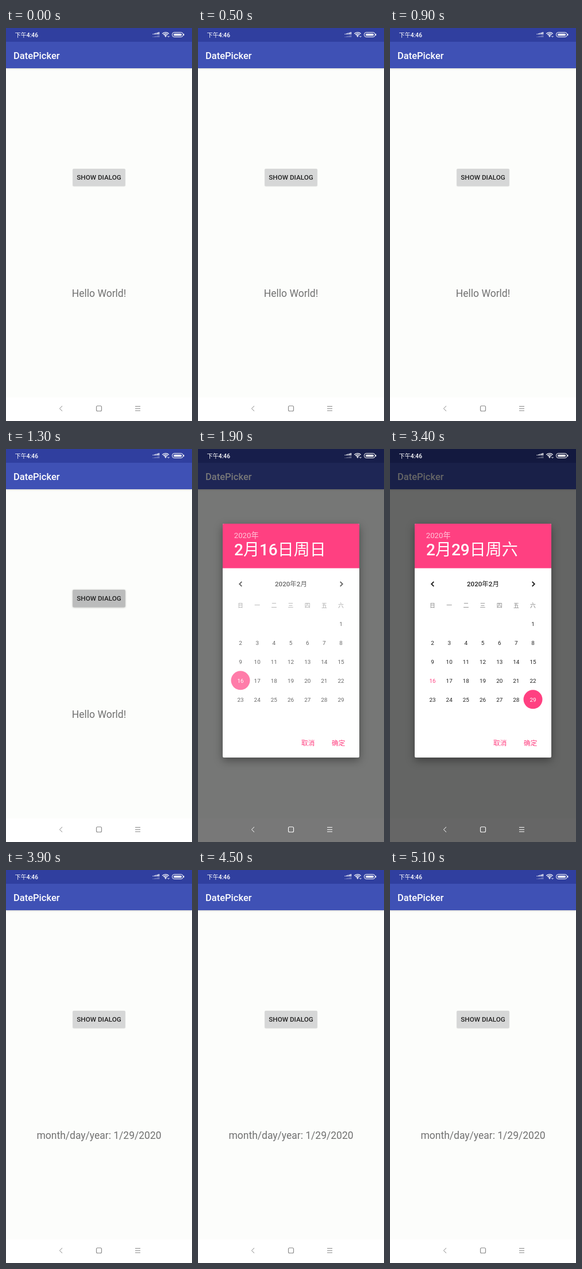
Recreate the animation shown at these times as an HTML page with a canvas. Size 324 by 684 pixels, loop 5200 ms.

```html
<!DOCTYPE html>
<html lang="zh">
<head>
<meta charset="utf-8">
<title>DatePicker</title>
<style>
html, body { margin: 0; width: 100%; height: 100%; overflow: hidden; background: #fff; }
canvas { display: block; width: 324px; height: 684px; }
</style>
</head>
<body>
<canvas id="stage"></canvas>
<script>
const W = 324, H = 684, LOOP = 5200, STEP = 100;
const PINK = '#ff4081';
const WEEK = '日一二三四五六';
const FAMILY = 'Roboto, "Noto Sans CJK SC", "Noto Sans CJK", sans-serif';
const CJK_FAMILY = '"Noto Sans CJK SC", "Noto Sans CJK", sans-serif';
const ratio = window.devicePixelRatio || 1;

const stage = document.getElementById('stage');
const screen = prepare(stage);
const layer = document.createElement('canvas');
const sheet = prepare(layer);
let g = screen;

function prepare(canvas) {
  canvas.width = W * ratio;
  canvas.height = H * ratio;
  const c = canvas.getContext('2d');
  c.scale(ratio, ratio);
  return c;
}

const clamp = v => Math.max(0, Math.min(1, v));
const ramp = (t, from, length) => clamp((t - from) / length);

function rect(x, y, w, h, color) {
  g.fillStyle = color;
  g.fillRect(x, y, w, h);
}

function round(x, y, w, h, r, color) {
  g.beginPath();
  g.roundRect(x, y, w, h, r);
  g.fillStyle = color;
  g.fill();
}

function line(points, color, width) {
  g.beginPath();
  points.forEach(([x, y], i) => i ? g.lineTo(x, y) : g.moveTo(x, y));
  g.strokeStyle = color;
  g.lineWidth = width;
  g.stroke();
}

function text(s, x, y, size, color, weight = 400, align = 'left') {
  g.font = `${weight} ${size}px ${FAMILY}`;
  g.textAlign = align;
  g.fillStyle = color;
  g.fillText(s, x, y);
}

// Medium digits next to regular Chinese characters
function dateText(s, x, y, size, color) {
  g.textAlign = 'left';
  g.fillStyle = color;
  for (const part of s.match(/\d+|\D+/g)) {
    g.font = /\d/.test(part) ? `500 ${size}px ${FAMILY}` : `400 ${size}px ${CJK_FAMILY}`;
    g.fillText(part, x, y);
    x += g.measureText(part).width;
  }
}

function withShadow(color, blur, offset, draw) {
  g.save();
  g.shadowColor = color;
  g.shadowBlur = blur * ratio;
  g.shadowOffsetY = offset * ratio;
  draw();
  g.restore();
}

function drawPage(pressed, message) {
  rect(0, 0, W, H, '#fcfdfb');
  withShadow('rgba(0,0,0,.25)', 3, .8, () => rect(0, 24, W, 46, '#3f51b5'));
  rect(0, 0, W, 24, '#303f9f');
  text('DatePicker', 13, 54, 16.5, '#fff', 500);

  const face = () => round(116.3, 245, 91.4, 30.2, 1.6, pressed ? '#bbbcbc' : '#d6d7d7');
  if (pressed) withShadow('rgba(0,0,0,.3)', 3, .6, face);
  else withShadow('rgba(0,0,0,.15)', 1.5, .4, face);
  text('SHOW DIALOG', 162, 264.2, 11.7, '#212121', 500, 'center');
  text(message, 162, 468, 17.5, '#717171', 400, 'center');
  rect(0, 643, W, 41, '#fff');
}

function drawStatus() {
  text('下午4:46', 15.5, 15.5, 10.2, '#fff', 500);
  for (let i = 0; i < 5; i++) {
    const x = 255.5 + i * 2.5, h = 1 + i * .8;
    rect(x, 11.2 - h, 1.6, h, '#fff');
    rect(x, 16 - h * .8, 1.6, h * .8, 'rgba(255,255,255,.4)');
  }
  g.strokeStyle = '#fff';
  g.lineWidth = 1.4;
  for (const r of [2.6, 5.2, 7.8]) {
    g.beginPath();
    g.arc(278, 15.4, r, -Math.PI * .76, -Math.PI * .24);
    g.stroke();
  }
  round(277, 13.8, 2, 2, 1, '#fff');
  line([[281.5, 14], [283, 15.8], [284.5, 14]], '#fff', 1);
  g.beginPath();
  g.roundRect(289.6, 7.6, 18.8, 8, 3.5);
  g.lineWidth = 1;
  g.stroke();
  round(292, 9.7, 14, 3.8, 1.6, '#fff');
  rect(309, 10, 1.3, 3.2, '#fff');
}

function drawNav(color) {
  line([[98, 657.8], [93.4, 662.3], [98, 666.8]], color, 1);
  g.beginPath();
  g.roundRect(157.5, 657.8, 9, 9, 2);
  g.lineWidth = 1.1;
  g.stroke();
  for (const y of [658.5, 662.3, 666]) line([[225, y], [234, y]], color, 1);
}

function drawCalendar(day, alpha) {
  const ink = '#212121';
  g.globalAlpha = alpha;
  text('2020年2月', 162, 239.2, 11.55, ink, 500, 'center');
  line([[76.3, 231], [72.2, 235], [76.3, 239]], ink, 1.8);
  line([[247.7, 231], [251.8, 235], [247.7, 239]], ink, 1.8);

  const column = i => 74 + i * 29.17;
  [...WEEK].forEach((s, i) => text(s, column(i), 275.7, 9.9, '#808080', 400, 'center'));
  for (let d = 1; d <= 29; d++) {
    const cell = d + 5, x = column(cell % 7), y = 304 + 33 * Math.floor(cell / 7);
    const chosen = d === day;
    if (chosen) round(x - 16.5, y - 16.7, 33, 33, 16.5, PINK);
    g.globalAlpha = chosen ? 1 : alpha;
    text(d, x, y + 3.6, 9.9, chosen ? '#fff' : d === 16 ? PINK : ink, 400, 'center');
    g.globalAlpha = alpha;
  }
  g.globalAlpha = 1;
}

function drawDialog(day, calendarAlpha) {
  withShadow('rgba(0,0,0,.38)', 15, 5, () => round(43, 130, 238, 407, 2, '#fff'));
  round(43, 130, 238, 77.4, [2, 2, 0, 0], PINK);
  text('2020年', 62.8, 155.2, 13.2, 'rgba(255,255,255,.7)');
  dateText(`2月${day}日周${WEEK[(day + 5) % 7]}`, 63, 185, 28, '#fff');
  drawCalendar(day, calendarAlpha);
  text('取消', 191.7, 516.2, 11.6, PINK, 400, 'center');
  text('确定', 244.7, 516.2, 11.6, PINK, 400, 'center');
}

function drawScene(t) {
  const leaving = 1 - ramp(t, 3600, 300);
  const dim = .6 * ramp(t, 1600, 340) * leaving;
  const shown = ramp(t, 1600, 250) * leaving;
  const day = t < 2500 ? 16 : t < 3100 ? 21 : 29;

  g = screen;
  drawPage(t >= 1300 && t < 1700, t < 3700 ? 'Hello World!' : 'month/day/year: 1/29/2020');
  if (dim > 0) rect(0, 0, W, H, `rgba(0,0,0,${dim})`);
  drawStatus();
  drawNav(dim > .25 ? '#fff' : '#858585');

  if (shown > 0) {
    g = sheet;
    g.clearRect(0, 0, W, H);
    drawDialog(day, ramp(t, 1600, 440));
    g = screen;
    g.globalAlpha = shown;
    g.drawImage(layer, 0, 0, W, H);
    g.globalAlpha = 1;
  }
}

const start = performance.now();
function tick() {
  const t = (performance.now() - start) % LOOP;
  drawScene(Math.floor(t / STEP) * STEP);
  requestAnimationFrame(tick);
}
tick();
</script>
</body>
</html>
```
